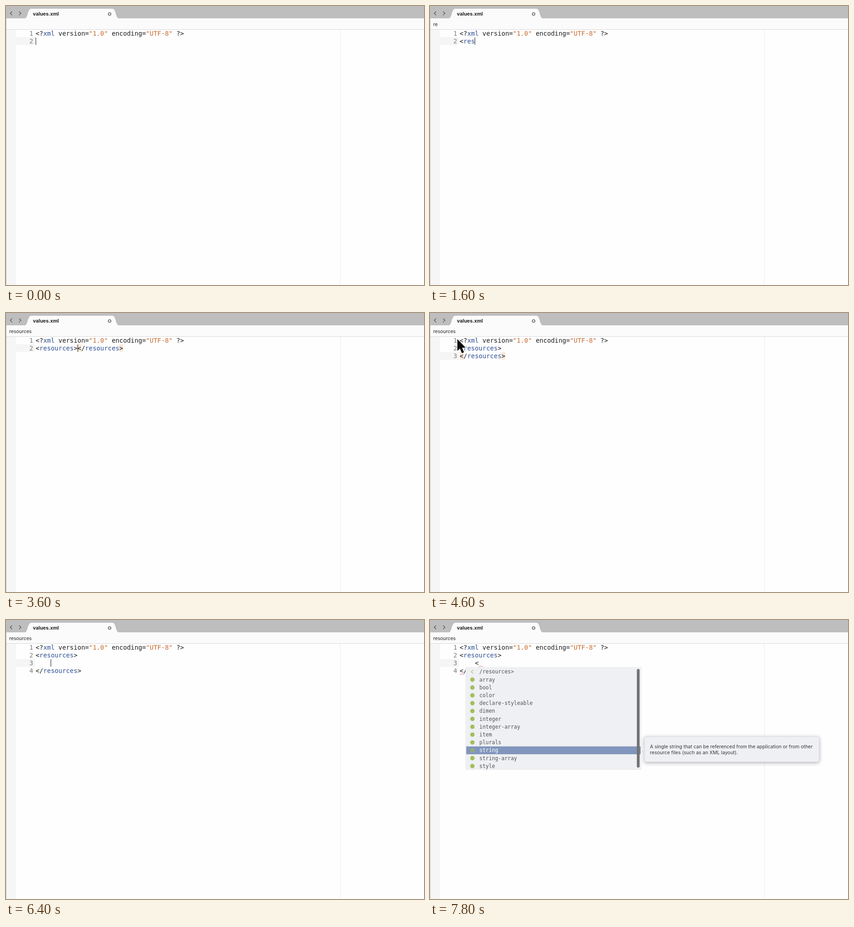
These frames come from a looping animation (917x611 px, 8000 ms). An HTML page with a canvas:

```html
<!DOCTYPE html>
<html lang="en">
<head>
<meta charset="utf-8">
<title>values.xml</title>
<style>
html, body { margin: 0; width: 100%; height: 100%; overflow: hidden; background: #fefefe; }
canvas { display: block; width: 917px; height: 611px; }
</style>
</head>
<body>
<canvas id="stage" width="917" height="611"></canvas>
<script>
const ctx = document.getElementById('stage').getContext('2d');
const LOOP = 8000, STEP = 200;
const CODE = '13.86px "DejaVu Sans Mono", monospace';
const LIST = '11.45px "DejaVu Sans Mono", monospace';
const UI = '10.5px Inter, sans-serif';
const LEFT = 65, COL = 8.345, ROW = 17.2, MID = 59.6;

const HEAD = '<?xml version="1.0" encoding="UTF-8" ?>';
const OPEN = '<resources>', CLOSE = '</resources>';
const TAGS = ['/resources>', 'array', 'bool', 'color', 'declare-styleable', 'dimen', 'integer',
  'integer-array', 'item', 'plurals', 'string', 'string-array', 'style'];
const ROOT_TIP = ['This must be the root node.'];
const STRING_TIP = ['A single string that can be referenced from the application or from other',
  'resource files (such as an XML layout).'];

const rootList = { x: 44, y: 87, items: ['resources'], pick: 0 };
const closeList = { x: 128, y: 87, items: [CLOSE], pick: 0 };
const tagList = { x: 78, y: 103.4, items: TAGS, pick: 10, bar: true };
const rootTip = { x: 438, y: 75.5, w: 162, h: 43, lines: ROOT_TIP };
const stringTip = { x: 470, y: 255, w: 384, h: 56, lines: STRING_TIP };

// Each entry overrides part of the editor state from its time on.
const script = [
  [0, { body: [''], caret: [1, 0], crumb: '', marks: [], list: null, tip: null, errors: [], typed: 0 }],
  [400, { body: ['<'], caret: [1, 1], typed: 400 }],
  [600, { list: rootList }],
  [1000, { tip: rootTip }],
  [1400, { body: ['<re'], caret: [1, 3], list: null, tip: null, typed: 1400 }],
  [1600, { body: ['<res'], caret: [1, 4], crumb: 're', typed: 1600 }],
  [1800, { body: ['<resou'], caret: [1, 6], crumb: 'reso', typed: 1800 }],
  [2000, { body: ['<resourc'], caret: [1, 8], crumb: 'resour', typed: 2000 }],
  [2200, { body: ['<resources'], caret: [1, 10], crumb: 'resources', typed: 2200 }],
  [2600, { body: [OPEN], caret: [1, 11], marks: [[1, 0], [1, 10]], typed: 2600 }],
  [2800, { list: closeList }],
  [3200, { body: [OPEN + CLOSE], caret: [1, 23], marks: [[1, 11], [1, 22]], list: null, typed: 3200 }],
  [3600, { caret: [1, 11], typed: 3600 }],
  [3800, { body: [OPEN, CLOSE], caret: [2, 0], marks: [[2, 0], [2, 11]], typed: 3800 }],
  [6200, { body: [OPEN, '', CLOSE], caret: [2, 4], marks: [], typed: 6200 }],
  [7000, { body: [OPEN, '    <', CLOSE], caret: [2, 5], typed: 7000 }],
  [7200, { list: tagList, tip: stringTip }],
  [7400, { errors: [[2, 5], [3, 0]] }]
];

// Pointer stops: time, x, y.
const stops = [[3800, 372, 551], [4600, 60, 57], [4800, 60, 57], [5600, 366, 538], [6000, 366, 538]];

const rowMid = r => MID + r * ROW;
const colX = c => LEFT + c * COL;

function box(x, y, w, h, color) {
  ctx.fillStyle = color;
  ctx.fillRect(x, y, w, h);
}

function label(s, x, y, font, color, align = 'left') {
  ctx.font = font;
  ctx.fillStyle = color;
  ctx.textAlign = align;
  ctx.fillText(s, x, y);
}

function line(points, color, width) {
  ctx.beginPath();
  points.forEach(([x, y]) => ctx.lineTo(x, y));
  ctx.strokeStyle = color;
  ctx.lineWidth = width;
  ctx.stroke();
}

function disc(x, y, r, color) {
  ctx.beginPath();
  ctx.arc(x, y, r, 0, 7);
  ctx.fillStyle = color;
  ctx.fill();
}

function drawFrame(crumb) {
  box(0, 0, 917, 611, '#fefefe');
  box(0, 0, 917, 27, '#bebebe');
  box(0, 27, 917, 24, '#fbfbfb');
  ctx.beginPath();
  ctx.moveTo(42, 27);
  ctx.bezierCurveTo(48, 26, 47, 6, 56, 6);
  ctx.lineTo(233, 6);
  ctx.bezierCurveTo(242, 6, 240, 26, 247, 27);
  ctx.fillStyle = '#fbfbfb';
  ctx.fill();
  box(0, 51, 917, 1, '#d9d9d9');
  box(1, 52, 21, 559, '#f6f6f6');
  box(0, 27, 1, 584, '#c4c4c4');
  box(733, 52, 1, 559, '#e9e9e9');
  line([[13.5, 12], [9.3, 16], [13.5, 20]], '#505050', 1.2);
  line([[28.8, 12], [33, 16], [28.8, 20]], '#505050', 1.2);
  ctx.beginPath();
  ctx.arc(227.3, 17.5, 2.9, 0, 7);
  ctx.strokeStyle = '#484848';
  ctx.lineWidth = 1.3;
  ctx.stroke();
  label('values.xml', 59, 21, '700 10.7px Inter, sans-serif', '#222');
  label(crumb, 7, 44, UI, '#222');
}

function drawCode(s, row) {
  const y = rowMid(row) + 5;
  let col = 0;
  for (const part of s.match(/"[^"]*"|(?<=<[\/?]?)\w+|\w+|[^"\w]+/g) || []) {
    const name = /<[\/?]?$/.test(s.slice(0, col)) && /^\w/.test(part);
    const color = part[0] === '"' ? '#c9692c' : name ? '#2d4f94' : '#1c1c1c';
    label(part, colX(col), y, CODE, color);
    col += part.length;
  }
}

function squiggle(row, col) {
  const y = rowMid(row) + 6.5, pts = [];
  for (let i = 0; i <= 5; i++) pts.push([colX(col) + i * 2, y + (i % 2) * 2]);
  line(pts, '#e27078', 1);
}

function drawEditor(s, t) {
  const [row, col] = s.caret;
  box(22, rowMid(row) - 8.6, 41, ROW, '#f5f5f5');
  s.marks.forEach(([r, c]) => box(colX(c), rowMid(r) - 8, COL, 16, '#f9e7d9'));
  [HEAD, ...s.body].forEach((text, i) => {
    label(i + 1, 59.5, rowMid(i) + 5, CODE, '#7c7c7c', 'right');
    drawCode(text, i);
  });
  s.errors.forEach(([r, c]) => squiggle(r, c));
  if ((t - s.typed) % 1000 < 600) box(Math.round(colX(col)), Math.round(rowMid(row) - 8), 1, 16, '#111');
}

function drawList({ x, y, items, pick, bar }) {
  box(x, y, 385.5, 224.3, '#e2e5e8');
  box(x + 0.5, y + 0.5, 384.5, 223, '#eef0f3');
  items.forEach((item, i) => {
    const mid = y + 10 + i * ROW, on = i === pick;
    if (on) box(x + 1.5, mid - 8.6, 382.5, ROW, '#8196bd');
    const green = on ? '#92aa78' : '#a4bd5b';
    if (item.includes('/')) line([[x + 16.5, mid - 4], [x + 12.5, mid], [x + 16.5, mid + 4]], green, 1.2);
    else disc(x + 15, mid, 4.8, green);
    label(item, x + 30.3, mid + 4, LIST, on ? '#fff' : '#505256');
  });
  if (bar) {
    ctx.beginPath();
    ctx.roundRect(x + 375.8, y + 3.8, 6, 216, 3);
    ctx.fillStyle = '#727272';
    ctx.fill();
  }
}

function drawTip({ x, y, w, h, lines }) {
  const mid = y + h / 2;
  ctx.save();
  ctx.shadowColor = 'rgba(0,0,0,0.3)';
  ctx.shadowBlur = 9;
  ctx.shadowOffsetY = 2;
  ctx.beginPath();
  ctx.roundRect(x, y, w, h, 4);
  ctx.moveTo(x + 1, mid - 6);
  ctx.lineTo(x - 4, mid);
  ctx.lineTo(x + 1, mid + 6);
  ctx.fillStyle = '#eef0f3';
  ctx.fill();
  ctx.restore();
  ctx.beginPath();
  ctx.roundRect(x + 0.5, y + 0.5, w - 1, h - 1, 4);
  ctx.strokeStyle = '#d2d4d7';
  ctx.lineWidth = 0.7;
  ctx.stroke();
  lines.forEach((s, i) => label(s, x + 12.5, y + 26 + i * 13.3, UI, '#35373a'));
}

function drawPointer(t) {
  const i = stops.findIndex(([at], n) => n && t < at && t >= stops[n - 1][0]);
  if (i < 0) return;
  const [t0, x0, y0] = stops[i - 1], [t1, x1, y1] = stops[i];
  const u = (t - t0) / (t1 - t0), k = u * u * (3 - 2 * u);
  ctx.save();
  ctx.translate(x0 + (x1 - x0) * k, y0 + (y1 - y0) * k);
  ctx.beginPath();
  [[0, 0], [0, 26], [5.6, 20.8], [10, 31], [14.6, 29], [10.4, 19.2], [18, 18.8]]
    .forEach(([x, y]) => ctx.lineTo(x, y));
  ctx.closePath();
  ctx.lineJoin = 'round';
  ctx.strokeStyle = '#fff';
  ctx.lineWidth = 2.2;
  ctx.stroke();
  ctx.fillStyle = '#0c0c0c';
  ctx.fill();
  ctx.restore();
}

function draw(now) {
  const t = Math.floor((now % LOOP) / STEP) * STEP;
  const s = Object.assign({}, ...script.filter(([at]) => at <= t).map(e => e[1]));
  drawFrame(s.crumb);
  drawEditor(s, t);
  if (s.list) drawList(s.list);
  if (s.tip) drawTip(s.tip);
  drawPointer(t);
}

const start = performance.now();
function tick() {
  draw(performance.now() - start);
  requestAnimationFrame(tick);
}
tick();
</script>
</body>
</html>
```
